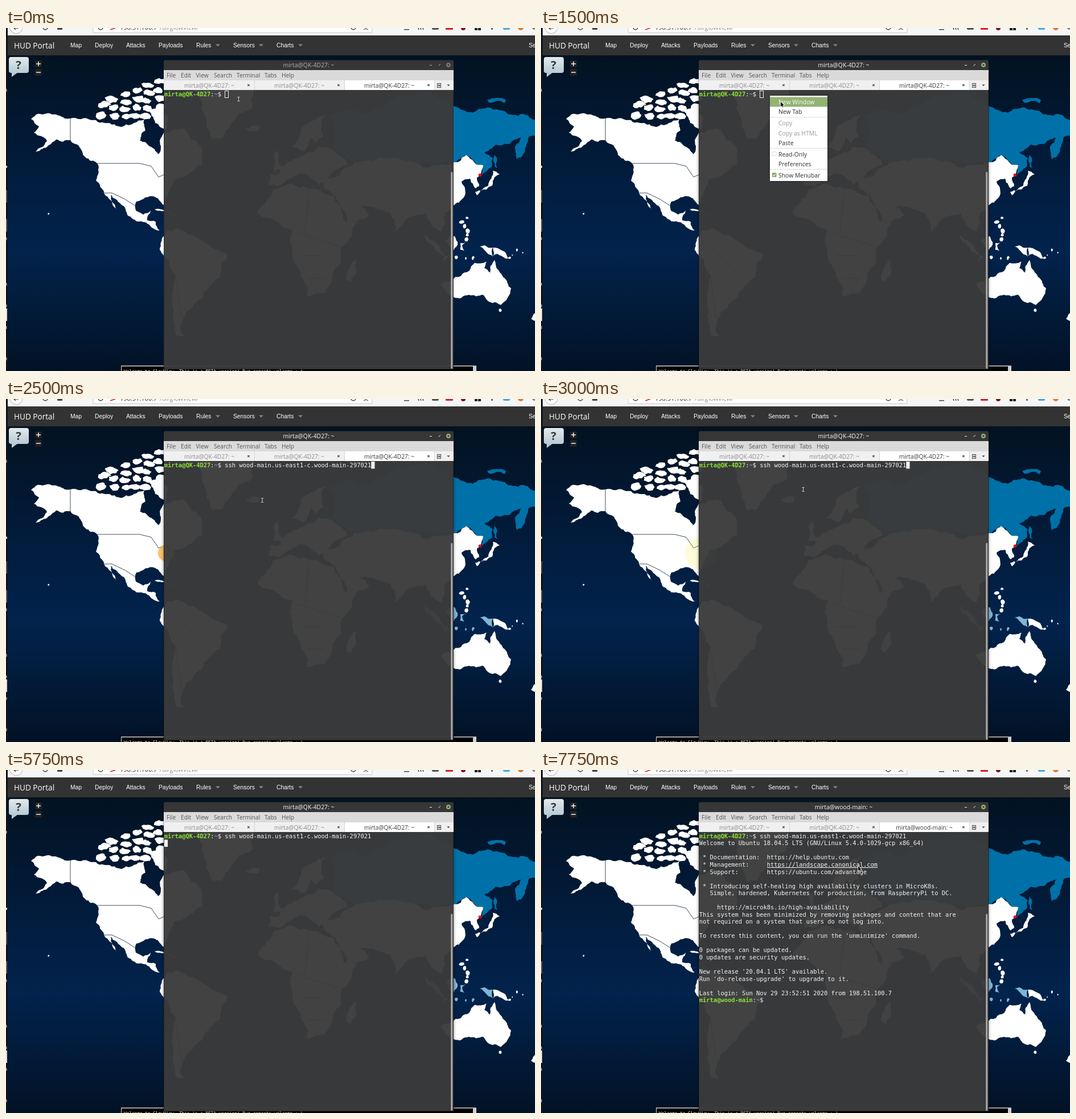
An HTML page with a canvas that plays this animation: 929 px wide and 603 px high, repeating every 8000 ms.

```html
<!DOCTYPE html>
<html>
<head>
<meta charset="utf-8">
<style>
html, body { margin: 0; height: 100%; overflow: hidden; background: #021226; }
canvas { display: block; }
</style>
</head>
<body>
<canvas id="stage" width="929" height="603"></canvas>
<script>
const g = document.getElementById('stage').getContext('2d');
const UI = '"Open Sans", "Noto Sans", sans-serif';
const ARIAL = '"Liberation Sans", Arial, sans-serif';
const MONO = '"DejaVu Sans Mono", monospace';
const LOOP = 8000, STEP = 125;
const USER = 'mirta', LOCAL = USER + '@QK-4D27', REMOTE = USER + '@wood-main';
const COMMAND = 'ssh wood-main.us-east1-c.wood-main-297021';
const OUTPUT = `Welcome to Ubuntu 18.04.5 LTS (GNU/Linux 5.4.0-1029-gcp x86_64)

 * Documentation:  https://help.ubuntu.com
 * Management:     https://landscape.canonical.com
 * Support:        https://ubuntu.com/advantage

 * Introducing self-healing high availability clusters in MicroK8s.
   Simple, hardened, Kubernetes for production, from RaspberryPi to DC.

     https://microk8s.io/high-availability
This system has been minimized by removing packages and content that are
not required on a system that users do not log into.

To restore this content, you can run the 'unminimize' command.

0 packages can be updated.
0 updates are security updates.

New release '20.04.1 LTS' available.
Run 'do-release-upgrade' to upgrade to it.

Last login: Sun Nov 29 23:52:51 2020 from 198.51.100.7`.split('\n');

// ---- map: few corner points, coast detail by midpoint displacement ----
let seed = 11;
const rand = () => (seed = seed * 16807 % 2147483647) / 2147483647;

function fray(path, x, y, u, v) {
  const dx = u - x, dy = v - y;
  if (Math.hypot(dx, dy) < 5) return path.lineTo(u, v);
  const k = (rand() - .5) * .3, mx = (x + u) / 2 - dy * k, my = (y + v) / 2 + dx * k;
  fray(path, x, y, mx, my);
  fray(path, mx, my, u, v);
}
function coast(points, path = new Path2D()) {
  const p = typeof points === 'string' ? points.split(/\s+/).map(Number) : points;
  const n = p.length;
  path.moveTo(p[0], p[1]);
  for (let i = 0; i < n; i += 2) fray(path, p[i], p[i + 1], p[(i + 2) % n], p[(i + 3) % n]);
  path.closePath();
  return path;
}
function isle(path, x, y, rx, ry) {
  const p = [];
  for (let a = 0; a < 6.2; a += .9) {
    const k = .75 + rand() * .5;
    p.push(x + rx * k * Math.cos(a), y + ry * k * Math.sin(a));
  }
  coast(p, path);
}
function isles(n, x, y, w, h, r) {
  const path = new Path2D();
  for (let i = 0; i < n; i++) isle(path, x + rand() * w, y + (i + .5) / n * h, r * (.5 + rand()), r * (.5 + rand()));
  return path;
}
function arctic() {
  const path = new Path2D();
  for (let i = 0; i < 6; i++) {
    const rows = 2 + Math.ceil(i * .6), top = 126 - i * 8, step = (162 - top) / rows;
    for (let j = 0; j < rows; j++)
      isle(path, 166 + i * 20 + rand() * 6, top + (j + .5) * step, 8 + rand() * 4, step * .4);
  }
  return path;
}

const america = coast(`44 160 72 150 113 159 150 162 180 167 222 169 243 160 235 198 252 208 267 222 270 198 277 184
  315 178 340 206 345 240 295 266 282 298 277 311 262 297 229 305 228 321 241 328 254 321 248 338 263 341 270 356
  255 350 214 330 184 293 194 320 172 290 158 268 160 238 128 207 113 197 88 196 52 218 72 199 49 184 58 173`);
const greenland = coast('330 109 436 109 432 140 396 168 377 195 363 196 348 152');
const southAmerica = coast('272 377 283 356 302 352 344 374 390 399 375 440 343 476 306 530 313 541 299 541 297 435 270 390');
const africa = coast('470 283 526 279 574 294 592 336 616 343 590 386 589 410 560 466 530 472 515 425 503 354 442 326');
const madagascar = coast('614 406 605 447 598 443');
const europe = coast('462 276 463 257 483 256 480 245 522 224 549 208 575 215 600 240 550 276 524 256 516 255 477 278');
const nordic = coast('498 210 518 178 562 152 558 191 543 203 535 190 524 216');
const asia = coast(`552 266 612 236 680 228 786 236 808 223 826 240 838 241 827 263 831 278 825 282 815 265 800 270
  806 282 803 299 770 326 765 358 752 350 738 325 697 345 684 358 675 325 618 312 638 328 600 342 578 295 558 281`);
const japan = coast('855 251 867 257 858 262 854 277 833 286 827 294 824 288 847 277');
const newGuinea = coast('855 386 873 392 882 405 863 397 855 402');
const australia = coast(`764 450 799 436 823 413 844 411 840 422 850 430 858 408 864 425 887 458 881 474 869 487
  850 482 838 469 813 469 786 473`);
const land = [america, greenland, southAmerica, africa, madagascar, europe, nordic, asia, japan, newGuinea, australia, arctic(),
  coast('250 140 277 139 285 158 282 180 262 167'), coast('420 176 446 173 443 182'), coast('470 223 478 216 488 247 471 251'),
  coast('261 319 280 320 300 329'), isles(6, 799, 330, 14, 45, 4), isles(4, 883, 388, 26, 18, 2),
  isles(1, 867, 488, 3, 16, 5), coast('929 501 922 511 935 518'), isles(1, 73, 326, 3, 1, 1.5)];

const westPapua = coast('832 384 840 382 855 386 855 402 842 392');
const indonesia = [westPapua, coast('733 363 770 401 752 386'), coast('772 374 788 366 793 376 786 391'),
  coast('798 378 807 377 801 382 805 392 798 390'), isles(6, 770, 402, 52, 4, 2.5)];
const russia = coast(`566 155 640 150 710 118 786 137 820 149 870 145 890 153 908 151 940 160 940 188 918 192 911 218
  897 231 894 210 906 192 885 203 860 205 840 219 855 229 853 244 835 260 838 241 826 240 808 223 786 236 680 228
  612 236 575 215`);
const russianIsles = [coast('858 222 862 228 863 246 858 243'), coast('845 126 878 127 876 132 848 131')];
const borders = new Path2D(`M113 159V197M160 238H235L255 243 268 262 277 258M172 290L186 290 209 301 226 312
  M855 386V402M532 291L525 360M510 360L590 385M518 400H555M530 440H560M300 385L345 430M297 435L308 510`);

// ---- drawing helpers ----
function box(x, y, w, h, color) { g.fillStyle = color; g.fillRect(x, y, w, h); }
function disc(x, y, r, color) {
  g.fillStyle = color; g.beginPath(); g.arc(x, y, r, 0, 7); g.fill();
}
function round(x, y, w, h, r, color) {
  g.fillStyle = color; g.beginPath(); g.roundRect(x, y, w, h, r); g.fill();
}
function line(color, width, ...p) {
  g.strokeStyle = color; g.lineWidth = width; g.beginPath();
  for (let i = 0; i < p.length; i += 2) g.lineTo(p[i], p[i + 1]);
  g.stroke();
}
function text(s, x, y, size, color, font = UI, align = 'left', weight = '') {
  g.font = `${weight} ${size}px ${font}`;
  g.fillStyle = color; g.textAlign = align; g.fillText(s, x, y);
}
function caret(x, y, r, color) {
  g.fillStyle = color; g.beginPath();
  g.moveTo(x - r, y); g.lineTo(x + r, y); g.lineTo(x, y + r); g.fill();
}
function cross(x, y, r, color) {
  line(color, 1.2, x - r, y - r, x + r, y + r);
  line(color, 1.2, x - r, y + r, x + r, y - r);
}
function fillAll(paths, color) { g.fillStyle = color; paths.forEach(p => g.fill(p)); }

function pulse(age) {
  const p = Math.min(age / 1000, 1);
  if (p > 0) disc(281, 271, 28.5 * p, `hsla(${19 + 36 * p},92%,63%,${Math.min(1, 1.4 - 1.2 * p)})`);
}

function drawMap(t) {
  const sea = g.createLinearGradient(0, 48, 0, 603);
  sea.addColorStop(0, '#021221');
  sea.addColorStop(.3, '#021a38');
  sea.addColorStop(.62, '#02234d');
  sea.addColorStop(1, '#021225');
  box(0, 48, 929, 555, sea);
  fillAll(land, '#fff');
  fillAll(indonesia, t < 2125 ? '#fff' : '#7eb6d6');
  fillAll([russia, ...russianIsles], '#0071a8');
  g.strokeStyle = '#0b2039'; g.lineWidth = .8;
  g.stroke(borders);
  disc(832.5, 258.5, 2.8, '#e3000f');
  if (t < 1375) pulse(t - 250);
  else if (t < 4625) pulse(t - 2000);
}

function drawPage() {
  const sheen = g.createLinearGradient(0, 50, 0, 80);
  sheen.addColorStop(0, '#e3ebee'); sheen.addColorStop(1, '#b6c9d2');
  round(5, 51, 35, 28, 4, sheen);
  g.beginPath(); g.moveTo(10, 78); g.lineTo(21, 78); g.lineTo(10, 86); g.fill();
  text('?', 22, 72, 20, '#34383b', UI, 'center', 'bold');
  for (const y of [57, 72]) {
    round(51, y, 12, 12, 2, '#222');
    line('#fff', 1.4, 53, y + 6, 61, y + 6);
  }
  line('#fff', 1.4, 57, 59, 57, 67);

  box(0, 13, 929, 35, '#333');
  text('HUD Portal', 14, 36, 13.6, '#fff');
  [['Map', 113], ['Deploy', 156], ['Attacks', 211], ['Payloads', 268], ['Rules', 334],
   ['Sensors', 399], ['Charts', 475], ['Settings', 918]].forEach(([s, x]) => text(s, x, 34, 10.3, '#fff', ARIAL));
  [372, 448, 517].forEach(x => caret(x, 28.5, 4, '#858585'));

  box(0, 0, 929, 13, '#f5f6f7');
  round(153, -20, 490, 28, 2, '#fff');
  line('#c8c8c8', 1, 153, 0, 153, 8, 643, 8, 643, 0);
  disc(18, -2, 12, '#b8b8b8'); disc(18, -2, 11, '#fff');
  line('#444', 1.5, 22, 0, 14, 0, 17, 3);
  g.strokeStyle = '#444'; g.lineWidth = 1.4;
  for (const x of [69, 166, 610]) { g.beginPath(); g.arc(x, -1, 4, 0, 3.14); g.stroke(); }
  round(90, -3, 9, 6, 1, '#444');
  line('#d02030', 1.5, 183, 3, 192, 0);
  text('198.51.100.7', 200, 2.5, 11, '#222');
  text('/ui/glowview/', 270, 2.5, 11, '#888');
  line('#555', 1.2, 628, 3, 632, 1, 636, 3);
  box(699, 2, 9, 1.5, '#444');
  for (let x = 724; x < 735; x += 4) line('#444', 1.5, x, 0, x + 1, 3);
  round(748, -5, 12, 8, 2, '#555');
  round(772, -8, 13, 11, 1, '#d5232f');
  disc(803, 0, 4, '#80101c');
  box(823, 0, 5, 4, '#222'); box(829, 0, 5, 4, '#222');
  box(852, 0, 3, 3, '#666');
  round(873, -5, 12, 8, 2, '#47a9d8');
  disc(904, -1, 5, '#e8762d'); disc(928, -1, 4, '#888');

  box(0, 0, 3, 603, '#10151c');
  box(0, 285, 2, 22, '#555'); box(0, 336, 2, 22, '#666');
  box(0, 493, 2, 22, '#ddd'); box(0, 242, 2, 4, '#ccc');
  [107, 368, 448, 486, 524, 579].forEach(y => box(0, y, 1.5, 5, '#8aa0b4'));

  box(202, 593.5, 624, 10, '#cfcfcf');
  box(203, 595, 617, 8, '#000');
  text('Welcome to GlowView. This is a BETA version! Bug reports welcome :-)', 207, 606, 7.7, '#fff', MONO);
}

// ---- terminal ----
const CELL = 6.267, ROW = 12.54, LEFT = 277.8;
const col = n => LEFT + n * CELL;
const mono = (s, c, r, color = '#f3f3f3', weight = '') =>
  text(s, col(c), 119.8 + r * ROW, 10.41, color, MONO, 'left', weight);
function prompt(host, r) {
  const n = host.length;
  mono(host, 0, r, '#8ae234', 'bold');
  mono(':', n, r);
  mono('~', n + 1, r, '#729fcf', 'bold');
  mono('$', n + 2, r);
}
const block = (c, r) => box(col(c), 110 + r * ROW, CELL, 12.5, '#f3f3f3');

function drawTerminal(t) {
  const focus = t >= 1125, done = t >= 6750;
  g.save();
  if (focus) { g.shadowColor = 'rgba(0,0,0,.5)'; g.shadowBlur = 5; }
  g.beginPath(); g.rect(0, 48, 277, 555); g.rect(786, 48, 143, 555); g.rect(277, 600, 509, 3); g.clip();
  box(277, 57, 509, 543, '#333');
  g.restore();
  box(277, 109, 509, 491, 'rgba(59,59,59,.96)');
  round(277, 56.5, 509, 18, [3, 3, 0, 0], '#363636');
  const host = done ? REMOTE : LOCAL, ink = focus ? '#f4f4f4' : '#adadad';
  text(host + ': ~', 531.5, 69, 10.4, ink, UI, 'center');
  line(ink, 1, 744, 65.5, 748, 65.5);
  line(ink, 1, 759.5, 66.5, 763, 63.5);
  disc(777, 65, 3.9, focus ? '#92b372' : '#777');
  cross(777, 65, 1.4, '#333');

  box(277, 74, 509, 18, '#dadada');
  [['File', 282], ['Edit', 307], ['View', 333.5], ['Search', 365], ['Terminal', 405], ['Tabs', 454], ['Help', 484]]
    .forEach(([s, x]) => text(s, x, 86.5, 10.2, '#555'));
  box(277, 92, 509, 17, '#f0f0f0');
  box(594, 92, 158, 17, '#fff');
  [277, 436, 594, 752].forEach(x => line('#d4d4d4', 1, x + .5, 92, x + .5, 109));
  [[357, LOCAL, '#8d8d8d'], [515, LOCAL, '#8d8d8d'], [673, host, '#3c3c3c']].forEach(([x, s, c]) => {
    text(s + ': ~', x, 105, 10.2, c, UI, 'center');
    cross(x + 69, 100.5, 1.7, '#444');
  });
  g.strokeStyle = '#444'; g.lineWidth = 1;
  g.strokeRect(757.5, 97.5, 6, 7);
  line('#444', 1.2, 758.5, 101, 763, 101);
  line('#444', 1.2, 760.5, 99, 760.5, 103);
  caret(777, 99.5, 2.6, '#333');

  round(781.3, 253, 3, 346, 1.5, '#aaa');
  line('#2b2b2b', 1, 277.5, 109, 277.5, 599.5, 785.5, 599.5, 785.5, 109);

  prompt(LOCAL, 0);
  if (t < 2250) {
    g.strokeStyle = '#eee'; g.lineWidth = 1;
    g.strokeRect(384.5, 110.5, 6, 12);
  } else {
    mono(COMMAND, 17, 0);
  }
  if (t >= 2250 && t < 5750 && !(t >= 5000 && t < 5625)) block(58, 0);
  if (t >= 5750 && t < 6500) block(0, 1);
  if (done) {
    OUTPUT.forEach((s, i) => mono(s, 0, i + 1));
    prompt(REMOTE, 23);
    if (t >= 7000 && t < 7500) block(19, 23);
    if (t >= 7750) line('#f3f3f3', 1, col(19), 171.5, col(50), 171.5);
  }
}

function drawMenu(py) {
  g.save();
  g.shadowColor = 'rgba(0,0,0,.4)'; g.shadowBlur = 4;
  box(402, 119, 101, 150, '#fff');
  g.restore();
  [['New Window', 130], ['New Tab', 147], ['Copy', 167], ['Copy as HTML', 184.5], ['Paste', 201.5],
   ['Read-Only', 221.5], ['Preferences', 239], ['Show Menubar', 258.5]].forEach(([s, y]) => {
    const off = s.startsWith('Copy'), hot = !off && Math.abs(py - y) < 8.7;
    if (hot) box(402, y - 8.5, 101, 17, '#92b372');
    text(s, 417, y + 4, 10.4, hot ? '#fff' : off ? '#999' : '#303030');
  });
  [157, 211.5, 248.5].forEach(y => line('#ddd', 1, 402, y, 503, y));
  round(406, 217.5, 7.5, 7.5, 1, '#d4d4d4');
  round(406.8, 218.3, 5.9, 5.9, 1, '#fff');
  round(406, 254.5, 7.5, 7.5, 1, '#7fa65b');
  line('#fff', 1.2, 407.5, 258, 409.3, 260, 412, 256.5);
}

// ---- pointer ----
const route = [[0, 408, 125], [250, 408, 125], [500, 414, 124], [875, 402, 119], [1125, 402, 119], [1500, 421, 130],
  [1875, 440, 194], [2250, 440, 194], [2750, 459, 162], [3000, 460, 159], [4500, 460, 159], [4625, 656, 113.5],
  [7625, 656, 113.5], [7750, 557, 169], [8000, 557, 169]];
function pointerAt(t) {
  const i = route.findIndex(k => k[0] > t);
  const [a, x, y] = route[i - 1], [b, u, v] = route[i], p = (t - a) / (b - a);
  return [x + (u - x) * p, y + (v - y) * p];
}
const arrow = new Path2D('M0 0V8L1.9 6.4 3.2 9.2 4.6 8.5 3.4 5.8 5.8 5.6Z');
function drawPointer(t, x, y) {
  if (t >= 5625 && t < 7750) return;
  if (t >= 1000 && t < 2250 || t >= 7750) {
    g.save();
    g.translate(x, y);
    g.lineWidth = 1.4; g.strokeStyle = '#fff'; g.stroke(arrow);
    g.fillStyle = '#111'; g.fill(arrow);
    g.restore();
  } else {
    line('#ccc', 1, x + .5, y - 3.5, x + .5, y + 3.5);
    for (const d of [-3.5, 3.5]) line('#ccc', 1, x - 1.5, y + d, x + 2.5, y + d);
  }
}

let start;
function frame(now) {
  start ??= now;
  const t = Math.floor((now - start) % LOOP / STEP) * STEP;
  const [x, y] = pointerAt(t);
  drawMap(t);
  drawPage();
  drawTerminal(t);
  if (t >= 1125 && t < 2250) drawMenu(y);
  drawPointer(t, x, y);
  requestAnimationFrame(frame);
}
requestAnimationFrame(frame);
</script>
</body>
</html>
```
